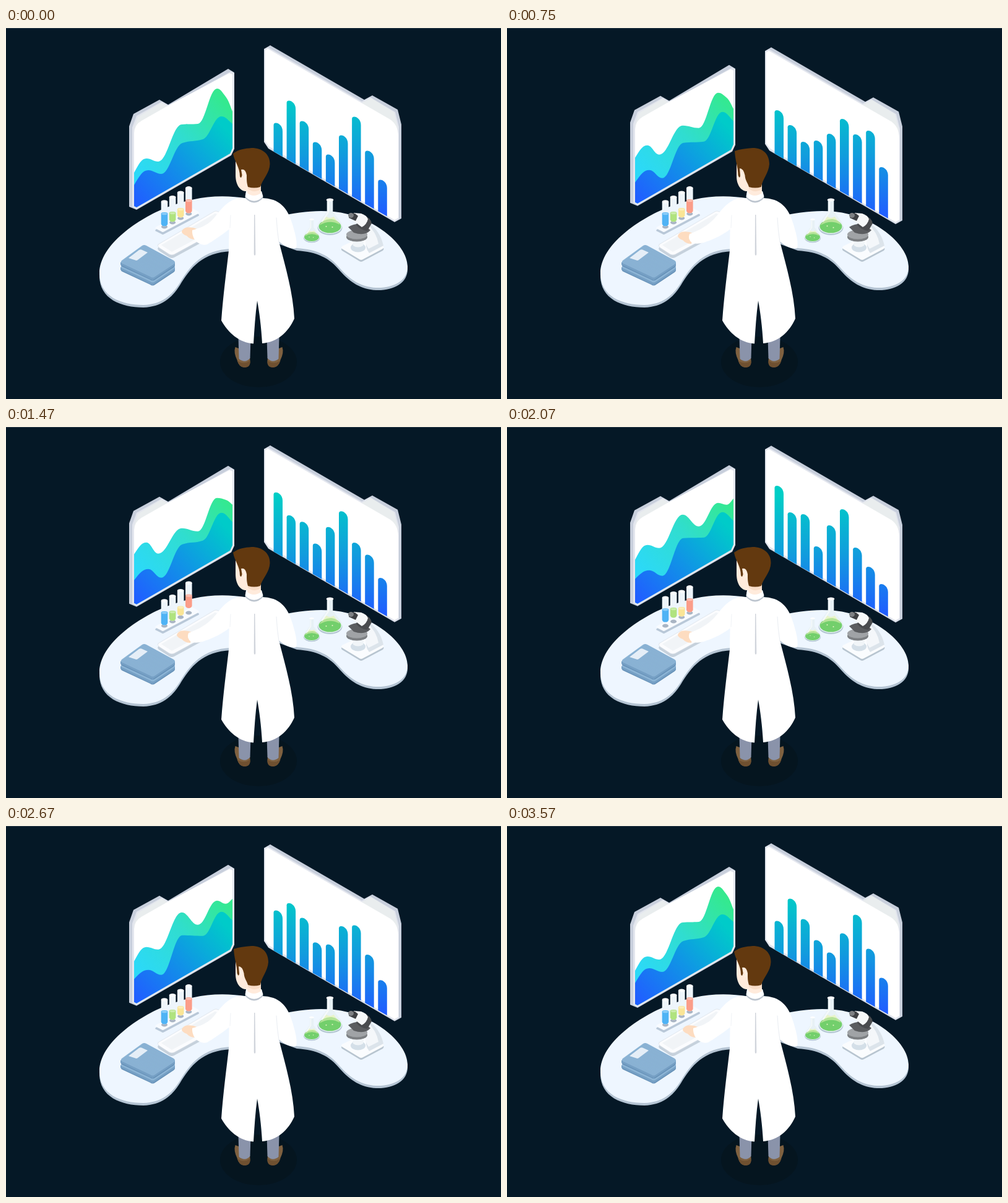
Animation, 800 px wide and 600 px high, one loop 3600 ms. Source, as an HTML page with a canvas:

```html
<!DOCTYPE html>
<html lang="en">
<head>
<meta charset="utf-8">
<title>Laboratory</title>
<style>
html, body { margin: 0; width: 100%; height: 100%; overflow: hidden; background: #051826; }
canvas { display: block; width: 800px; height: 600px; }
</style>
</head>
<body>
<canvas id="stage" width="800" height="600"></canvas>
<script>
const ctx = document.getElementById('stage').getContext('2d');
const LOOP = 3600;

const clamp = v => Math.max(0, Math.min(1, v));
const smooth = v => { v = clamp(v); return v * v * (3 - 2 * v); };
const lerp = (a, b, k) => a + (b - a) * k;
const ramp = (t, from, to) => smooth((t - from) / (to - from));

function fill(d, color) {
  ctx.fillStyle = color;
  ctx.fill(new Path2D(d));
}
function stroke(d, color, width = 1) {
  ctx.strokeStyle = color;
  ctx.lineWidth = width;
  ctx.lineCap = ctx.lineJoin = 'round';
  ctx.stroke(new Path2D(d));
}
function oval(x, y, rx, ry, color) {
  ctx.fillStyle = color;
  ctx.beginPath();
  ctx.ellipse(x, y, rx, ry, 0, 0, Math.PI * 2);
  ctx.fill();
}
function gradient(x0, y0, x1, y1, ...colors) {
  const g = ctx.createLinearGradient(x0, y0, x1, y1);
  colors.forEach((c, i) => g.addColorStop(i / (colors.length - 1), c));
  return g;
}
function shifted(dx, dy, draw) {
  ctx.save();
  ctx.translate(dx, dy);
  draw();
  ctx.restore();
}

// Area chart: heights of each curve at its key times
const AREA_TIMES = [0, 750, 1470, 2070, 2670, 3270, 3600];
const BACK = {
  xs: [207, 227, 246, 284, 310, 341, 355, 366],
  keys: [
    [234, 211, 216, 156, 155, 98, 111, 135],
    [216, 196, 211, 164, 168, 111, 119, 137],
    [209, 190, 208, 167, 172, 118, 121, 129],
    [219, 195, 200, 146, 165, 127, 130, 120],
    [222, 199, 203, 143, 163, 124, 129, 121],
    [232, 210, 215, 153, 157, 102, 115, 138]
  ]
};
const FRONT = {
  xs: [207, 230, 251, 285, 318, 348, 366],
  keys: [
    [254, 230, 236, 186, 180, 143, 155],
    [256, 236, 249, 192, 190, 142, 157],
    [251, 233, 247, 193, 187, 142, 157],
    [250, 236, 245, 184, 183, 142, 156],
    [251, 236, 244, 180, 181, 142, 156],
    [254, 231, 237, 186, 180, 142, 155]
  ]
};

function areaPath({ xs, keys }, t) {
  let i = 0;
  while (t >= AREA_TIMES[i + 1]) i++;
  const k = ramp(t, AREA_TIMES[i], AREA_TIMES[i + 1]);
  const next = keys[(i + 1) % keys.length];
  const ys = keys[i].map((y, j) => lerp(y, next[j], k));
  const slope = j => (ys[j + 1] - ys[j]) / (xs[j + 1] - xs[j]);
  const tangent = j => {
    if (j === 0) return slope(0) * 1.6;
    if (j === xs.length - 1) return slope(j - 1) * 1.2;
    const a = slope(j - 1), b = slope(j);
    return a * b <= 0 ? 0 : 2 * a * b / (a + b);
  };
  let d = `M${xs[0]} ${ys[0]}`;
  for (let j = 1; j < xs.length; j++) {
    const h = (xs[j] - xs[j - 1]) * 0.4;
    d += `C${xs[j - 1] + h} ${ys[j - 1] + h * tangent(j - 1)} ${xs[j] - h} ${ys[j] - h * tangent(j)} ${xs[j]} ${ys[j]}`;
  }
  return d + 'L366 194L362 203L211 290L207 288Z';
}

function leftPanel(t) {
  fill('M199 159L206 139L248 116L262 124L359 66L369 72V195L364 206L211 294L199 289Z', '#c8cfdc');
  fill('M204 161L211 142L252 119L264 126L364 70L369 73V195L364 205L211 293L204 289Z', '#e3e6ee');
  fill('M207 163L213 144L251 121L264 128L250 145L207 180Z', '#e9edee');
  fill('M207 170Q208 156 219 150L262 125.5L361 73L366 75V194L362 203L211 290L207 288Z', '#fff');
  fill(areaPath(BACK, t), gradient(215, 235, 350, 115, '#2cd9f7', '#30ddd0', '#34e98f'));
  fill(areaPath(FRONT, t), gradient(215, 285, 350, 158, '#205fff', '#1094e6', '#00cbc9'));
}

// Bar chart: three sets of bar tops, each change followed by a rest
const BARS = [
  [153, 117, 150, 184, 204, 173, 143, 198, 245],
  [129, 153, 180, 178, 167, 143, 168, 162, 221],
  [92, 135, 138, 190, 156, 130, 192, 223, 251]
];

function rightPanel(t) {
  fill('M427 28L579 116L592 109L633 132L639 156V308L628 314L424 195L417 184V34Z', '#c8cfdc');
  fill('M417 34L423 31L575 119L588 112L629 136L635 160V309L628 313L424 194L417 184Z', '#e3e6ee');
  fill('M575 121L590 113L627 136L633 160V178L600 140Z', '#e9edee');
  fill('M419 36L423 33.5L621 148Q633 156 634 174V307L628 310.5L425 191.5L419 183Z', '#fff');
  const step = Math.floor(t / 1200);
  const k = ramp(t % 1200, 0, 430);
  const base = x => 200 + 0.572 * (x - 433);
  const paint = gradient(0, 108, 0, 300, '#00cec6', '#119cdd', '#205dff');
  BARS[step].forEach((from, i) => {
    const top = lerp(from, BARS[(step + 1) % 3][i], k);
    const x = 432.5 + i * 21.1, r = x + 14.5;
    fill(`M${x} ${base(x)}V${top + 4}C${x} ${top - 3} ${r} ${top + 1} ${r} ${top + 14}V${base(r)}Z`, paint);
  });
}

const LEFT_DESK = 'M392 276C340 267 300 275 260 290C215 308 151 350 151 397C151 434 186 448 222 448C251 447 268 433 281 412C298 384 317 359 364 357L392 340Z';
const RIGHT_DESK = 'M440 305C470 298 500 294 530 297C590 303 649 348 649 386C649 409 626 421 598 420C574 419 556 407 540 389C523 368 503 358 470 356L440 345Z';

function desk() {
  for (const d of [LEFT_DESK, RIGHT_DESK]) {
    shifted(0, 4, () => fill(d, '#b5c4d3'));
    fill(d, '#eef6ff');
  }
}

function books() {
  const cover = 'M187 376L220 352Q223 350 227 352L271 376Q275 379 271 382L241 402Q237 405 233 402L188 381Q184 379 187 376Z';
  for (const dy of [8, 0]) {
    shifted(0, dy + 5, () => fill(cover, '#648fb6'));
    fill(`M185 ${379 + dy}V${383 + dy}L237 ${408 + dy}L273 ${384 + dy}V${379 + dy}Z`, '#759fc4');
    shifted(0, dy, () => fill(cover, '#8cb4d5'));
  }
  ctx.save();
  ctx.clip(new Path2D(cover));
  for (let i = 0; i < 26; i++) stroke(`M${186 + i * 2} ${380 + i}l38 -28`, 'rgba(116,158,196,.4)', 0.7);
  ctx.restore();
  fill('M198 372L215 359Q217 358 219 358.5L229 363L213 375Q211 376.5 209 375.5Z', '#e5eef7');
}

function keyboard() {
  const slab = 'M246 350L336 297Q339 295 343 297L371 312L272 366Q268 368 264 366L247 355Q244 352 246 350Z';
  shifted(0, 5, () => fill(slab, '#c6d1dc'));
  fill(slab, '#fbfcfe');
  stroke(slab, '#dce3ea', 0.8);
  fill('M251 351L338 300L362 312L268 362Z', '#f1f4f7');
}

const LIQUIDS = [['#4fb3f5', 19], ['#b0e37f', 13], ['#fae596', 12], ['#fb9d89', 19]];

function tubes(t) {
  const rack = 'M242 322L298 292Q300 291 302 292L311 297Q313 299 311 300L256 329Q253 331 251 329L241 324Z';
  shifted(0, 4, () => fill(rack, '#b9c8d8'));
  fill(rack, '#f8fbff');
  LIQUIDS.forEach(([color, depth], i) => {
    const x = 256 + i * 13.1;
    const bottom = 319.5 - i * 7;
    oval(x, bottom + 2, 5, 3, '#a9b5c4');
    // The lift travels along the rack
    const d = Math.abs(t % 900 - (210 + i * 120)) / 180;
    const lift = d < 1 ? 3.3 * (1 + Math.cos(Math.PI * d)) : 0;
    const top = 281 - i * 7.4;
    const level = bottom - depth;
    shifted(0, -lift, () => {
      const body = y => `M${x - 5.3} ${y}V${bottom - 3}A5.3 4 0 0 0 ${x + 5.3} ${bottom - 3}V${y}Z`;
      fill(body(top), '#eef5fb');
      fill(body(level), color);
      oval(x, level, 5.3, 2.4, color);
      oval(x, level, 4.6, 1.8, 'rgba(255,255,255,.35)');
      oval(x, top, 5.3, 2.7, '#fbfdff');
    });
  });
}

function flask(x, y, s, t) {
  ctx.save();
  ctx.translate(x, y);
  ctx.scale(s, s);
  oval(0, 2, 20, 12, '#b3c6d2');
  fill('M-4.8 -43H4.8V-24L19 -5Q21 2 16 7Q0 17 -16 7Q-21 2 -19 -5L-4.8 -24Z', '#e7f1f5');
  fill('M-6 -16Q0 -12 6 -16L16 -3H-16Z', '#e8f4c9');
  oval(0, 0, 18, 10.5, '#73cf6c');
  fill('M-17 -2Q-10 -13 3 -12Q14 -10 16 -3Q0 -12 -17 -2Z', '#b5e398');
  oval(0, -43, 5.8, 2.6, '#fff');
  fill('M-4 -40H-1V-23L-12 -7L-14 -8L-4 -24Z', 'rgba(255,255,255,.55)');
  const bob = Math.sin(t / 1200 * Math.PI * 2);
  oval(-6, bob, 1, 1, '#e7f7c5');
  oval(4, 1 - bob, 1, 1, '#e7f7c5');
  ctx.restore();
}

function microscope() {
  const base = 'M543 353L570 340L609 352Q612 354 609 357L577 374Q574 376 571 374L543 357Q541 355 543 353Z';
  shifted(0, 3, () => fill(base, '#b8c5d0'));
  fill(base, '#fafcfe');
  fill('M586 315Q605 329 610 352L587 364Q579 354 583 341Z', '#dce4eb');
  fill('M584 317Q599 331 602 349L586 357Q578 347 583 337Z', '#f4f7fa');
  oval(569, 355, 12, 7.5, '#d4dfe8');
  fill('M559 339H579L577 352Q569 357 561 352Z', '#f1f5f8');
  oval(567, 338, 17, 7.5, '#7d8083');
  oval(567, 334, 17, 7.5, '#a0a3a6');
  fill('M553 322Q566 314 580 319L589 327Q580 337 562 331Z', '#5b5d60');
  // Eyepiece, barrel and head
  fill('M575 301Q590 307 591 316L584 328Q571 326 566 318Z', '#494b4e');
  fill('M562 299L574 300Q583 303 585 309Q583 318 575 322L563 313Z', '#f6f8f9');
  fill('M556 299L564 300L569 304L565 312L554 307Z', '#3f4144');
  oval(557.5, 303, 4.5, 4, '#7e8184');
}

function legs() {
  oval(408, 540, 62, 41, '#05151f');
  for (const flip of [1, -1]) {
    ctx.save();
    ctx.translate(408.5, 0);
    ctx.scale(flip, 1);
    fill('M-38 516Q-41 525 -35 537Q-32 549 -23 549Q-13 548 -14 538L-15 525Z', '#7f6140');
    fill('M-33 500H-13L-14 534Q-22 543 -32 535Z', '#8a93aa');
    fill('M-35 538Q-24 545 -14 538Q-13 549 -23 549Q-31 549 -35 538Z', '#6f5030');
    ctx.restore();
  }
}

function arm(t) {
  const k = ramp(t, 100, 600) - ramp(t, 2130, 2620);
  const m = (a, b) => lerp(a, b, k);
  shifted(-8 * k, 7 * k, () =>
    fill('M309 325Q299 321 290 323Q284 326 284 330Q286 334 292 336Q297 342 306 342Z', '#fddcc0'));
  fill(`M380 275C362 276 352 288 342 300C332 313 ${m(326, 320)} ${m(320, 324)} ${m(301, 295)} ${m(327, 333)}Q${m(300, 291)} ${m(335, 342)} ${m(306, 300)} ${m(344, 348)}Q${m(316, 309)} ${m(353, 350)} ${m(325, 318)} ${m(350, 347)}C345 338 356 329 368 320Z`, '#fff');
}

function coat() {
  fill('M387 275C370 275 363 282 361 300L360 360C356 395 351 432 348 473C359 493 377 509 400 510.5C401.5 486 403 463 406 441C409.5 460 412.5 483 414 510C439 508 456 492 466 470C464 428 452 388 441 345C451 354 461 358 469 356Q471 348 467 332C460 304 453 286 432 278Q423 275 414 275Z', '#fff');
  stroke('M437 307Q438 327 441 346', '#e9edf2', 1);
  stroke('M363 303L362 323', '#f0f3f7', 1);
  fill('M401 302H402.4L403.3 366Q402 370 400.7 366Z', '#d0d4db');
}

function head(t) {
  const p = t % 1800;
  const k = ramp(p, 330, 710) - ramp(p, 950, 1400);
  const m = (a, b) => lerp(a, b, k);
  fill('M388 265L386.5 275Q401 290 415.5 275L413 265Z', '#bcc4ce');
  fill('M388 264L386.5 272.5Q401 287 415.5 272.5L413 264Z', '#fff');
  fill(`M371 211V${m(238, 240)}C371 252 377 263 387 264H390V267Q400 275 412 267V245L396 211Z`, '#ffebdc');
  fill('M391 257H412V261Q401 268 391 260Z', '#f9ddc8');
  fill(`M${m(367, 368)} ${m(203, 199)}C376 196 386 195 397 194C414 194 ${m(427, 424)} 204 ${m(426.5, 424)} 220C${m(426, 423)} 235 ${m(415, 413)} 244 411 257Q401 260 391 257C389 250 ${m(389, 385)} 247 ${m(389, 384.5)} 238Q${m(387, 382)} 227 ${m(380, 376)} ${m(229, 227)}L${m(381.5, 377)} ${m(238, 239)}Q${m(380, 376)} 245 ${m(378, 373.5)} ${m(240, 238)}C${m(378, 373.5)} 225 ${m(369, 369)} 216 ${m(367, 368)} ${m(203, 199)}Z`, '#63390f');
  stroke(`M${m(384, 379)} ${m(233, 234)}Q${m(387, 381)} 238 ${m(385, 380)} 244`, '#fff4ea', 1.6);
}

function draw(t) {
  ctx.fillStyle = '#051826';
  ctx.fillRect(0, 0, 800, 600);
  ctx.fillStyle = '#2b3c48';
  ctx.fillRect(0, 0, 800, 1);
  const p = (t % 1200) / 600;
  const hover = smooth(p < 1 ? p : 2 - p);
  shifted(0, -7.5 * hover, () => leftPanel(t));
  shifted(0, 4 * hover, () => rightPanel(t));
  desk();
  books();
  keyboard();
  tubes(t);
  flask(523.5, 321, 1, t);
  flask(494, 338, 0.66, t);
  microscope();
  legs();
  arm(t);
  coat();
  head(t);
}

function tick() {
  draw(performance.now() % LOOP);
  requestAnimationFrame(tick);
}
tick();
</script>
</body>
</html>
```
